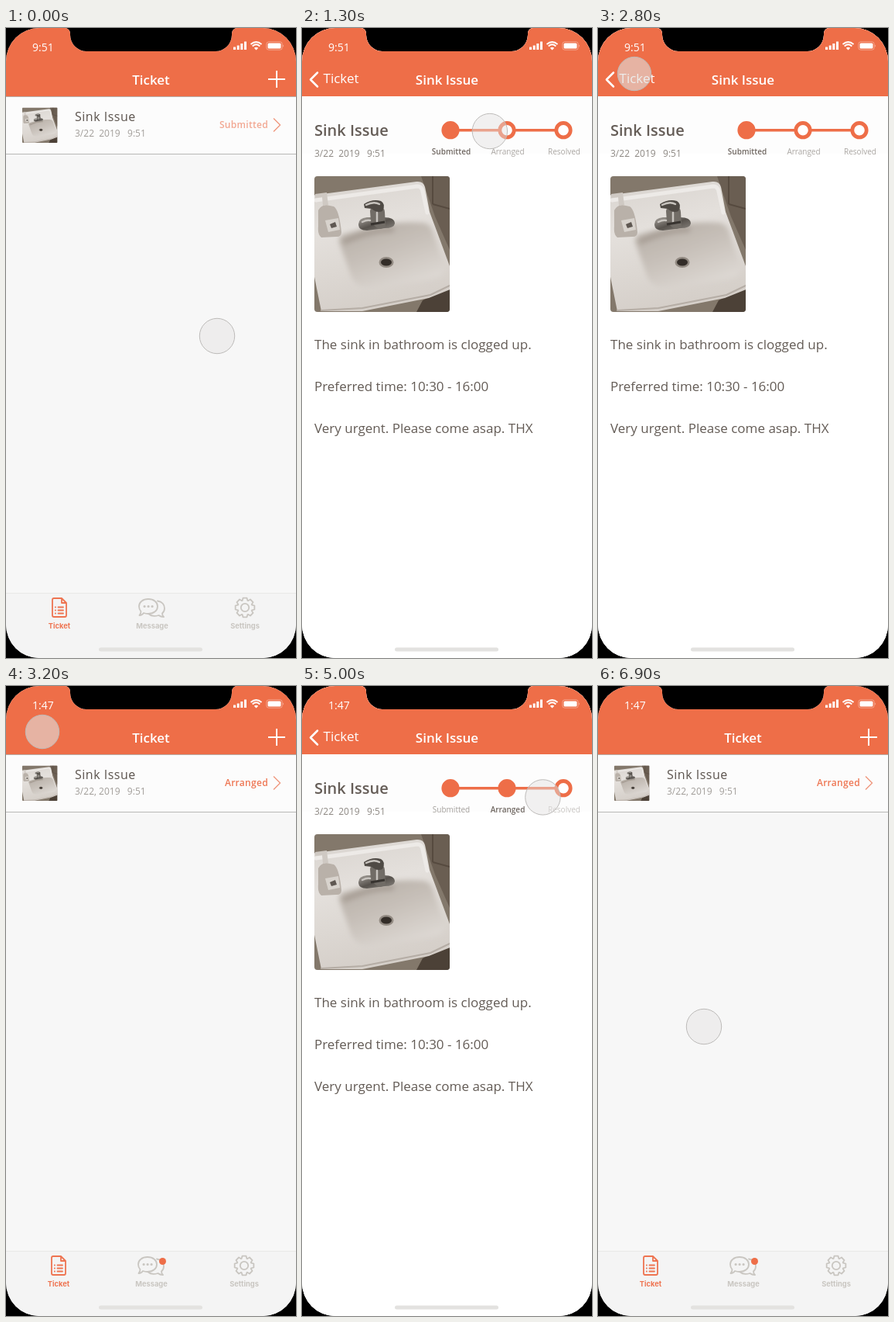
These frames come from a looping animation (375 px wide and 812 px high, 7000 ms). An HTML page:

```html
<!DOCTYPE html>
<html lang="en">
<head>
<meta charset="utf-8">
<title>Ticket</title>
<style>
html, body { margin: 0; width: 100%; height: 100%; overflow: hidden; background: #000; }
svg { display: block; }
text { font-family: "Open Sans", sans-serif; white-space: pre; }
.semi { font-weight: 600; }
.tab { font: 700 9.3px Inter, sans-serif; text-anchor: middle; }
.line { fill: none; stroke-linecap: round; stroke-linejoin: round; }
</style>
</head>
<body>
<svg width="375" height="812" viewBox="0 0 375 812">
  <defs>
    <clipPath id="screen"><path d="M0 43A43 43 0 0 1 43 0H76A7 7 0 0 1 83 7V9A21 21 0 0 0 104 30H271A21 21 0 0 0 292 9V7A7 7 0 0 1 299 0H332A43 43 0 0 1 375 43V769A43 43 0 0 1 332 812H43A43 43 0 0 1 0 769Z"/></clipPath>
    <clipPath id="frame"><rect width="175" height="175" rx="4"/></clipPath>
    <filter id="soft" x="-20%" y="-20%" width="140%" height="140%"><feGaussianBlur stdDeviation="3"/></filter>
    <filter id="edge" x="-20%" y="-20%" width="140%" height="140%"><feGaussianBlur stdDeviation=".7"/></filter>
    <linearGradient id="rim" x1="0" y1="0" x2=".25" y2="1">
      <stop offset="0" stop-color="#d8d3ce"/><stop offset=".4" stop-color="#e4e0dc"/><stop offset="1" stop-color="#d5cfc9"/>
    </linearGradient>
    <linearGradient id="bowl" x1="0" y1="0" x2=".6" y2="1">
      <stop offset="0" stop-color="#b3aba3"/><stop offset=".55" stop-color="#c8c1ba"/><stop offset="1" stop-color="#dcd7d2"/>
    </linearGradient>
    <linearGradient id="metal" x1="0" y1="0" x2="1" y2="1">
      <stop offset="0" stop-color="#a8a39d"/><stop offset=".5" stop-color="#57524d"/><stop offset="1" stop-color="#8b8680"/>
    </linearGradient>
    <g id="photo" clip-path="url(#frame)">
      <rect width="175" height="175" fill="#83786b"/>
      <path d="M138 0H175V95L156 52Z" fill="#6a5e52"/>
      <path d="M153 0V36M153 36L175 42" stroke="#564a3f" stroke-width="2"/>
      <path d="M140 160L175 144V175H132Z" fill="#4c4137"/>
      <g filter="url(#edge)">
        <path d="M-4 25L132 7Q141 6 143 14L149 46L178 124V145L148 157L62 174H9L-4 110Z" fill="url(#rim)"/>
        <path d="M2 31L133 13Q139 13 140 20L146 47" class="line" stroke="#edeae7" stroke-width="5"/>
        <path d="M9 173L62 170L150 153L175 141" class="line" stroke="#b5ada5" stroke-width="2"/>
      </g>
      <g filter="url(#soft)">
        <path d="M32 85Q30 76 45 73Q95 57 139 60Q149 60 153 70L168 116Q170 128 154 132L72 143Q54 144 48 130Z" fill="url(#bowl)"/>
        <path d="M40 84Q70 70 100 69" class="line" stroke="#a89f96" stroke-width="7"/>
      </g>
      <g filter="url(#edge)">
        <ellipse cx="93" cy="111" rx="9.500" ry="7" fill="#938b83"/>
        <ellipse cx="93" cy="111" rx="7" ry="4.600" fill="#332d28"/>
        <path d="M57 62Q57 54 68 53H90Q104 53 104 61Q103 67 91 67L68 70Q57 70 57 62Z" fill="url(#metal)"/>
        <path d="M73 59L72 45Q72 39 81 39Q91 39 91 46L92 65Q85 71 79 65Z" fill="#716c66"/>
        <path d="M64 36Q75 29 86 32Q93 36 88 45Q81 48 74 42L65 41Z" fill="#4f4a45"/>
        <path d="M67 37Q77 32 84 36M62 59Q68 56 72 57M81 47V60" class="line" stroke="#c8c4bf" stroke-width="2.500"/>
        <path d="M73 62L91 59" stroke="#383430" stroke-width="3"/>
        <path d="M5 44Q8 38 15 37L25 39Q32 43 35 72Q35 78 29 78L9 79Q4 75 5 65Z" fill="#b9b1a9"/>
        <path d="M11 38L10 27L1 28V23L16 21L18 37Z" fill="#cfc9c3"/>
        <path d="M14 57L31 54L33 69L18 72Z" fill="#d8d3cd"/>
        <path d="M20 62L27 59L29 65L22 67Z" fill="#5f5852"/>
      </g>
    </g>
  </defs>
  <rect width="375" height="812"/>
  <g clip-path="url(#screen)">
    <g id="list">
      <rect width="375" height="812" fill="#f7f7f7"/>
      <rect y="88" width="375" height="75" fill="#fcfcfc"/>
      <path d="M0 162.500H375" stroke="#b9b8b7"/>
      <rect width="375" height="88" fill="#ee6e48"/>
      <path d="M0 88.500H375" stroke="#b9aca7"/>
      <text class="semi" x="187.500" y="72.500" font-size="17" fill="#fff" text-anchor="middle">Ticket</text>
      <path d="M339 66H361M350 55V77" stroke="#fff" stroke-width="2"/>
      <use href="#photo" transform="translate(21 102.5) scale(.26)"/>
      <text x="89" y="120" font-size="16" letter-spacing=".5" fill="#5b534d">Sink Issue</text>
      <text id="date" x="89" y="140" font-size="12" fill="#a19d99"></text>
      <text id="status" class="semi" x="339" y="129" font-size="12" letter-spacing=".3" text-anchor="end"></text>
      <path d="M346 116.500L354.500 125L346 133.500" fill="none" stroke="#f0967c" stroke-width="1.300"/>
      <rect y="728" width="375" height="84" fill="#f4f4f4"/>
      <path d="M0 728.500H375" stroke="#e8e8e7"/>
      <g id="tabs">
        <g class="line" stroke="#ee7451" stroke-width="1.800">
          <path d="M62 735H72L78 741V757Q78 759 76 759H62Q60 759 60 757V737Q60 735 62 735ZM72 735V741H78"/>
          <path d="M67.500 746.500H74M67.500 750.500H74M67.500 754.500H74M63.800 746.500H64M63.800 750.500H64M63.800 754.500H64"/>
        </g>
        <g class="line" stroke="#c9c6c1" stroke-width="1.800">
          <path d="M184 736C191 736 196 740 196 745.500S191 755 184 755Q181 755 178 754Q176 757 172.500 757Q174.500 755 174.500 752Q172 749 172 745.500C172 740 177 736 184 736Z"/>
          <path d="M196 738.500C202 739.500 205 743.500 205 748Q205 752 202 754.500Q202 757 204 759Q200 759 197.500 757C192 758.500 187 757.500 185 755.500"/>
          <path d="M179 745.500H179.200M184 745.500H184.200M189 745.500H189.200" stroke-width="3"/>
          <path id="gear"/>
          <circle cx="309" cy="747" r="5.200"/>
        </g>
        <text class="tab" x="69" y="774" fill="#ee7451">Ticket</text>
        <text class="tab" x="189" y="774" fill="#c9c6c1">Message</text>
        <text class="tab" x="309" y="774" fill="#c9c6c1">Settings</text>
        <circle id="badge" cx="203.500" cy="741.500" r="4.500" fill="#ee6e48"/>
      </g>
    </g>
    <g id="detail">
      <rect width="375" height="812" fill="#fff"/>
      <rect y="88" width="375" height="74" fill="#fdfdfd"/>
      <rect width="375" height="88" fill="#ee6e48"/>
      <path d="M20 57.500L11 66.500L20 75.500" class="line" stroke="#fff" stroke-width="2.500"/>
      <text x="27.500" y="71" font-size="17" fill="#fff">Ticket</text>
      <text class="semi" x="187.500" y="73" font-size="17" fill="#fff" text-anchor="middle">Sink Issue</text>
      <text class="semi" x="16" y="139" font-size="20" fill="#655d57">Sink Issue</text>
      <text x="16" y="166" font-size="12" fill="#8d8883">3/22  2019   9:51</text>
      <path d="M192 131.700H338" stroke="#ee6e48" stroke-width="3.500"/>
      <g id="steps"></g>
      <use href="#photo" x="16" y="191"/>
      <g font-size="17" fill="#635b55">
        <text x="16" y="414">The sink in bathroom is clogged up.</text>
        <text x="16" y="468">Preferred time: 10:30 - 16:00</text>
        <text x="16" y="522">Very urgent. Please come asap. THX</text>
      </g>
    </g>
    <rect x="120" y="798.500" width="134" height="5" rx="2.500" fill="#e3e2e0"/>
    <text id="clock" x="34" y="30" font-size="14" fill="#fff"></text>
    <g fill="#fff">
      <path d="M294 24.500H297V28H294ZM298.700 22.500H301.700V28H298.700ZM303.300 20H306.300V28H303.300ZM308 17.500H311V28H308Z"/>
      <path d="M323.500 28.500L320.800 25.800Q323.500 23.500 326.200 25.800Z"/>
      <rect x="338.500" y="19.500" width="17" height="7" rx="1.500"/>
      <path d="M358.300 21.500Q360 23 358.300 24.500Z" opacity=".6"/>
    </g>
    <path d="M318.700 23.500Q323.500 19.200 328.300 23.500M316.500 21Q323.500 15 330.500 21" fill="none" stroke="#fff" stroke-width="1.900"/>
    <rect x="336.800" y="17.800" width="20.400" height="10.400" rx="3" fill="none" stroke="#fff" stroke-opacity=".35"/>
    <circle id="touch" fill="#e2e1e0" stroke="#bdbbb9"/>
  </g>
</svg>
<script>
const LOOP = 7000;
const $ = id => document.getElementById(id);

// Touch path: time, x, y
const path = [
  [0, 273, 397], [400, 313, 133], [900, 313, 133], [1300, 243, 133],
  [1600, 214, 351], [1900, 167, 505], [2100, 144, 486], [2700, 47, 59],
  [3250, 47, 59], [3500, 59, 185], [3700, 130, 268], [4000, 267, 218],
  [4250, 313, 133], [4900, 313, 133], [5600, 262, 397], [5800, 220, 458],
  [6300, 47, 59], [6600, 47, 59], [6900, 137, 439], [7000, 137, 439]
];
const presses = [[380, 720], [2680, 3300], [4330, 4750], [6330, 6620]];

const clamp = v => Math.max(0, Math.min(1, v));
const ramp = (t, a, b) => clamp((t - a) / (b - a));

// Tangent is flat wherever the axis turns or rests
function tangent(i, k) {
  const a = path[i - 1], b = path[i], c = path[i + 1];
  if (!a || !c) return 0;
  const turn = (b[k] - a[k]) * (c[k] - b[k]) <= 0;
  return turn ? 0 : (c[k] - a[k]) / (c[0] - a[0]);
}

function along(t, k) {
  let i = 0;
  while (i < path.length - 2 && t >= path[i + 1][0]) i++;
  const a = path[i], b = path[i + 1], d = b[0] - a[0], u = (t - a[0]) / d;
  const s = u * u * (3 - 2 * u);
  return a[k] + (b[k] - a[k]) * s
    + d * u * (1 - u) * ((1 - u) * tangent(i, k) - u * tangent(i + 1, k))
    - (b[k] - a[k]) * 0;
}

function gearPath() {
  let d = "";
  for (let i = 0; i < 8; i++) {
    [[-.36, 9.6], [-.2, 12.6], [.2, 12.6], [.36, 9.6]].forEach(([da, r]) => {
      const a = i * Math.PI / 4 + da;
      d += (d ? "L" : "M") + (309 + r * Math.sin(a)).toFixed(2) + " " + (747 - r * Math.cos(a)).toFixed(2);
    });
  }
  return d + "Z";
}

function drawSteps(active) {
  const tones = ["#a39f9b", "#6f6761", "#aaa6a2", "#c9c6c3"];
  $("steps").innerHTML = ["Submitted", "Arranged", "Resolved"].map((name, i) => {
    const x = 192 + 73 * i, on = i === active;
    const tone = on ? tones[1] : i < active ? tones[0] : tones[2 + active];
    return `<circle cx="${x}" cy="131.7" r="9.2" fill="${i <= active ? "#ee6e48" : "#fff"}" stroke="#ee6e48" stroke-width="4.8"/>
      <text x="${x + 1}" y="163" font-size="10" text-anchor="middle" font-weight="${on ? 600 : 400}" fill="${tone}">${name}</text>`;
  }).join("");
}

let step = -1;
function draw(t) {
  const later = t >= 2850;
  $("clock").textContent = later ? "1:47" : "9:51";
  $("date").textContent = later ? "3/22, 2019   9:51" : "3/22  2019   9:51";
  $("status").textContent = later ? "Arranged" : "Submitted";
  $("status").setAttribute("fill", later ? "#ee7653" : "#f2a791");
  $("badge").setAttribute("visibility", later ? "visible" : "hidden");
  $("tabs").setAttribute("transform", `translate(${later ? -1 : 0} 0)`);

  const now = t >= 4000 ? 1 : 0;
  if (now !== step) drawSteps(step = now);

  const shown = ramp(t, 550, 750) - ramp(t, 2850, 3100) + ramp(t, 4600, 4800) - ramp(t, 6450, 6650);
  $("detail").setAttribute("opacity", shown);

  const press = Math.max(...presses.map(([a, b]) => ramp(t, a, a + 100) * (1 - ramp(t, b - 100, b))));
  const touch = $("touch");
  touch.setAttribute("cx", along(t, 1));
  touch.setAttribute("cy", along(t, 2));
  touch.setAttribute("r", 22.7 - press);
  touch.setAttribute("fill-opacity", .45 + .15 * press);
}

$("gear").setAttribute("d", gearPath());
const start = performance.now();
function tick() {
  draw((performance.now() - start) % LOOP);
  requestAnimationFrame(tick);
}
tick();
</script>
</body>
</html>
```
